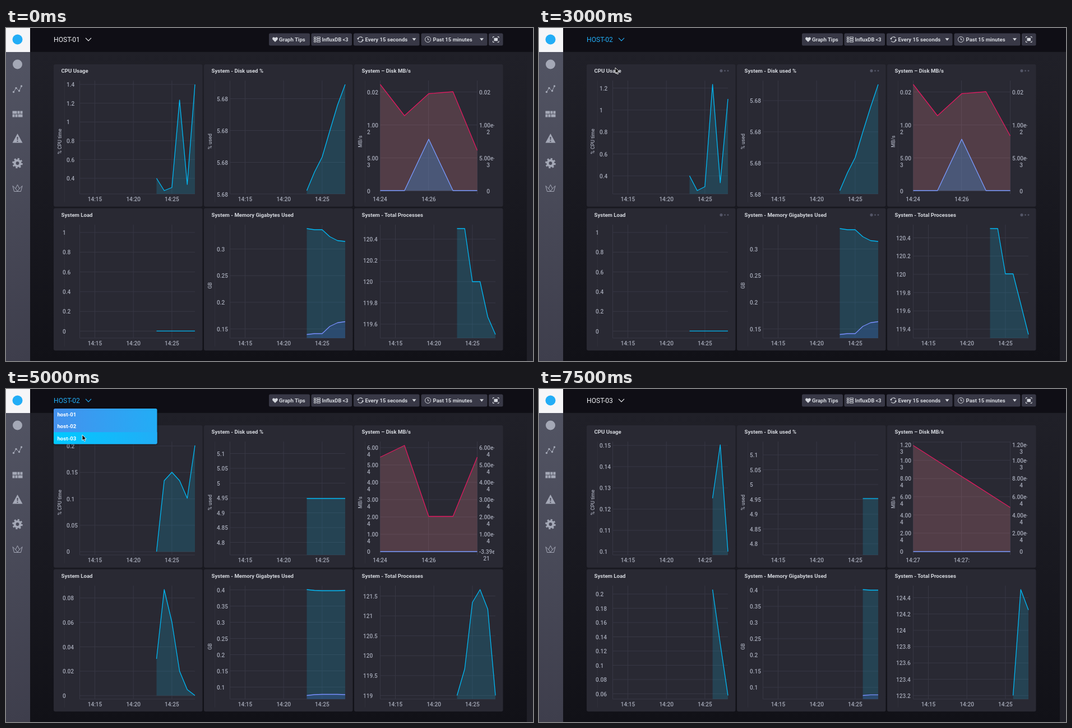
Animation, 940 px wide and 596 px high, one loop 8 s. Source, as an HTML page:

```html
<!DOCTYPE html>
<html lang="en">
<head>
<meta charset="utf-8">
<title>Host dashboard</title>
<style>
html, body { margin: 0; width: 100%; height: 100%; overflow: hidden; background: #17171c; }
svg { display: block; width: 940px; height: 596px; font-family: Roboto, sans-serif; }
text { white-space: pre; }
.bold { font-size: 9.6px; font-weight: 600; fill: #d4d7dd; }
.tick { font-size: 10.1px; font-weight: 500; fill: #a4a8b6; }
.unit { font-size: 8.8px; font-weight: 500; fill: #a4a8b6; }
.host { font-size: 12.1px; }
.mid { text-anchor: middle; }
.grid { stroke: #373744; fill: none; }
.line { fill: none; stroke-width: 1.3; stroke-linejoin: round; }

/* every change is a hard cut on a 250 ms beat */
.scene, .name, .late, #menu, .row, #dots, #cursor, #title, #every {
  animation: 8s step-end infinite;
}
.scene, .name, #menu, .row, #dots { visibility: hidden; }
#s0 { animation-name: s0; }
#s1 { animation-name: s1; }
#s2, #n2 { animation-name: s2; }
#s3, #n3 { animation-name: s3; }
#n1 { animation-name: n1; }
#n2 { animation-name: n2; }
#dots { animation-name: dots; }
#menu { animation-name: menu; }
#row2 { animation-name: row2; }
#row3 { animation-name: row3; }
#title { animation-name: title; fill: #eeeff2; stroke: none; color: #eeeff2; }
#every { animation-name: every; color: #d4d7dd; }
#cursor { animation-name: cursor; transform: translate(342px, -30px); }
@keyframes s0 { 0% { visibility: visible } 28.125% { visibility: hidden } }
@keyframes s1 { 28.125% { visibility: visible } 40.625% { visibility: hidden } }
@keyframes s2 { 40.625% { visibility: visible } 71.875% { visibility: hidden } }
@keyframes s3 { 71.875%, 100% { visibility: visible } }
@keyframes n1 { 0% { visibility: visible } 37.5% { visibility: hidden } }
@keyframes n2 { 37.5% { visibility: visible } 71.875% { visibility: hidden } }
@keyframes dots { 37.5% { visibility: visible } 40.625% { visibility: hidden } }
@keyframes menu {
  21.875% { visibility: visible } 37.5% { visibility: hidden }
  56.25% { visibility: visible } 71.875% { visibility: hidden }
}
@keyframes row2 {
  31.25% { visibility: visible } 37.5% { visibility: hidden }
  59.375% { visibility: visible } 62.5% { visibility: hidden }
}
@keyframes row3 { 62.5% { visibility: visible } 71.875% { visibility: hidden } }
@keyframes title {
  18.75% { fill: #22adf6; color: #22adf6 }
  40.625% { fill: #eeeff2; color: #eeeff2 }
  50% { fill: #6cc4f5; color: #6cc4f5 }
  53.125% { fill: #22adf6; color: #22adf6 }
  71.875% { fill: #eeeff2; color: #eeeff2 }
}
@keyframes every { 90.625% { color: #fff } 93.75% { color: #d4d7dd } }
@keyframes cursor {
  3.125% { transform: translate(342.5px, -9px) }
  6.25% { transform: translate(253px, 37px) }
  12.5% { transform: translate(199px, 29.5px) }
  15.625% { transform: translate(147px, 21.5px) }
  28.125% { transform: translate(144px, 43px) }
  31.25% { transform: translate(139px, 64px) }
  34.375% { transform: translate(136px, 71px) }
  46.875% { transform: translate(138px, 43.5px) }
  50% { transform: translate(144px, 32px) }
  59.375% { transform: translate(140px, 69.5px) }
  62.5% { transform: translate(136px, 82px) }
  65.625% { transform: translate(136px, 87.5px) }
  84.375% { transform: translate(144.5px, 89.5px) }
  87.5% { transform: translate(671.5px, 63px) }
  90.625% { transform: translate(705px, -4px) }
  93.75%, 100% { transform: translate(705px, -30px) }
}
</style>
</head>
<body>
<svg viewBox="0 0 940 596">
  <defs>
    <linearGradient id="page" x2="0" y2="1"><stop stop-color="#202028"/><stop offset="1" stop-color="#111117"/></linearGradient>
    <linearGradient id="side" x2="0" y2="1"><stop stop-color="#525463"/><stop offset="1" stop-color="#3e3e4c"/></linearGradient>
    <linearGradient id="blue"><stop stop-color="#4591ed"/><stop offset="1" stop-color="#22adf6"/></linearGradient>
    <linearGradient id="cyan"><stop stop-color="#00c9ff"/><stop offset="1" stop-color="#22adf6"/></linearGradient>
    <clipPath id="edge"><path d="M621 65H871V320H621Z"/></clipPath>
  </defs>

  <path fill="url(#page)" d="M43 43H940V596H43Z"/>
  <path fill="#202028" d="M929 43H940V596H929Z"/>
  <path fill="#0f0e15" d="M43 0H940V42.5H43Z"/>

  <!-- sidebar -->
  <path fill="url(#side)" d="M0 43H43V596H0Z"/>
  <path fill="#f6f6f8" d="M0 0H43V43H0Z"/>
  <circle cx="20.5" cy="20.5" r="9" fill="#22adf6"/>
  <g fill="#a4a8b6">
    <circle cx="20.5" cy="65" r="8.5"/>
    <path d="M13.5 114.5 18 107.5 23.5 112.5 27.5 104" fill="none" stroke="#a4a8b6"/>
    <circle cx="13.5" cy="114.5" r="1.7"/><circle cx="18" cy="107.5" r="1.7"/>
    <circle cx="23.5" cy="112.5" r="1.7"/><circle cx="27.5" cy="104" r="1.7"/>
    <path d="M11.5 148.5h8v5h-8zM20.5 148.5h4v5h-4zM25.5 148.5h4v5h-4zM11.5 154.5h4v5h-4zM16.5 154.5h4v5h-4zM21.5 154.5h8v5h-8z"/>
    <path fill-rule="evenodd" d="M20.5 189 29.5 205.5H11.5ZM19.4 195l.4 5.5h1.4l.4-5.5zM19.5 202v1.8h2V202z"/>
    <g fill="none" stroke="#a4a8b6">
      <circle cx="20.5" cy="242" r="5" stroke-width="4.2"/>
      <circle cx="20.5" cy="242" r="7.9" stroke-width="2.8" stroke-dasharray="3.1 3.1"/>
      <path d="M14.5 292.5 12 282.5 17 287.5 20.5 280.5 24 287.5 29 282.5 26.5 292.5ZM17 287.5 20.5 292 24 287.5"/>
    </g>
  </g>

  <!-- header -->
  <g id="title">
    <g class="host">
      <text class="name" id="n1" x="85" y="25">HOST-01</text>
      <text class="name" id="n2" x="85" y="25">HOST-02</text>
      <text class="name" id="n3" x="85" y="25">HOST-03</text>
    </g>
    <path d="M142 17.8 147 22.8 152 17.8" fill="none" stroke="currentColor" stroke-width="1.2"/>
  </g>
  <g fill="#383846">
    <rect x="469" y="9.5" width="73" height="22" rx="2.5"/>
    <rect x="544.5" y="9.5" width="72.5" height="22" rx="2.5"/>
    <rect x="620" y="9.5" width="117.5" height="22" rx="2.5"/>
    <rect x="740.5" y="9.5" width="118" height="22" rx="2.5"/>
    <rect x="861" y="9.5" width="25.5" height="22" rx="2.5"/>
  </g>
  <g fill="#d4d7dd">
    <path d="M480 25 476 21C473.500 17.500 477.500 14.800 480 17.700 482.500 14.800 486.500 17.500 484 21Z"/>
    <text class="bold" x="487" y="24">Graph Tips</text>
    <g fill="none" stroke="#d4d7dd">
      <path d="M549.500 16h3v2.300h-3zM549.500 19.500h3v2.300h-3zM549.500 23h3v2.300h-3zM554.500 16h6v2.300h-6zM554.500 19.500h6v2.300h-6zM554.500 23h6v2.300h-6z" stroke-width=".9"/>
      <circle cx="752.500" cy="20.500" r="5"/>
      <path d="M752.500 17.500V21H755"/>
      <path d="M868.500 18v-2.500h2.500M876.500 15.500h2.500V18M879 23v2.500h-2.500M871 25.500h-2.500V23"/>
    </g>
    <text class="bold" x="563.5" y="24" style="font-size:9.1px">InfluxDB &lt;3</text>
    <text class="bold" x="761.5" y="24">Past 15 minutes</text>
    <path d="M845 18.300h7l-3.500 4.500zM870.500 17.700h6.500v5.600h-6.500z"/>
  </g>
  <g id="every" fill="currentColor">
    <path d="M627.800 19A4.600 4.600 0 0 1 636 18M636.400 22A4.600 4.600 0 0 1 628.200 23" fill="none" stroke="currentColor" stroke-width="1.1"/>
    <path d="M626 18.200h4l-2 3zM634.200 22.600h4l-2-3z"/>
    <text class="bold" x="640.5" y="24" style="fill:currentColor">Every 15 seconds</text>
    <path d="M724.500 18.300h7l-3.500 4.500z"/>
  </g>

  <g id="panels"></g>
  <g id="scenes"></g>
  <g id="dots" fill="#545667"></g>

  <!-- host menu -->
  <g id="menu">
    <rect x="85" y="35" width="184.500" height="63.500" rx="2.5" fill="url(#blue)" style="filter:drop-shadow(0 1px 2px rgba(0,0,0,.5))"/>
    <rect class="row" id="row2" x="85" y="56" width="184.500" height="21.200" fill="url(#cyan)"/>
    <path class="row" id="row3" d="M85 77.300H269.500V96a2.500 2.500 0 0 1-2.500 2.500H87.500A2.500 2.500 0 0 1 85 96Z" fill="url(#cyan)"/>
    <g class="bold" style="fill:#fff">
      <text x="91.500" y="48.500">host-01</text>
      <text x="91.500" y="70">host-02</text>
      <text x="91.500" y="91.500">host-03</text>
    </g>
  </g>

  <path id="cursor" d="M0 0V10.200L2.300 8 3.900 11.700 5.600 11 4 7.400H7.200Z" fill="#000" stroke="#fff" stroke-width=".9"/>
</svg>

<script>
const $ = id => document.getElementById(id);
const text = (x, y, s, cls = 'tick') => `<text class="${cls}" x="${x}" y="${y}">${s}</text>`;
const path = (d, attrs) => `<path d="${d}" ${attrs}/>`;

const CYAN = ['#00b9f5', '#18acd0', .2];
const VIOLET = ['#7a8fff', '#3c60b8', .27];
const RED = ['#e0195f', '#c8787f', .26];
const SKY = ['#7a9bff', '#3c88d1', .35];

const COL = 268, ROW = 258;
const TITLES = ['CPU Usage', 'System - Disk used %', 'System – Disk MB/s',
  'System Load', 'System - Memory Gigabytes Used', 'System - Total Processes'];
const UNITS = ['% CPU time', '% used', 'MB/s', '', 'GB', ''];

TITLES.forEach((title, i) => {
  const dx = i % 3 * COL, dy = i > 2 ? ROW : 0;
  const ux = 99 + dx, uy = 203 + dy;
  $('panels').innerHTML +=
    `<rect x="${85 + dx}" y="${65 + dy - (dy ? .5 : 0)}" width="265.500" height="254.700" rx="3" fill="#292933"/>` +
    path(`M${104.5 + dx} ${94 + dy}V${312 + dy}`, 'stroke="#30303b"') +
    text(98.5 + dx, 80.3 + dy, title, 'bold') +
    `<g transform="rotate(-90 ${ux} ${uy})">${text(ux, uy, UNITS[i], 'unit mid')}</g>`;
  [[325, 2.6], [331.5, 1.4], [337, 1.4]].forEach(([x, r]) => {
    $('dots').innerHTML += `<circle cx="${x + dx}" cy="${76.6 + dy}" r="${r}"/>`;
  });
});

// Area with its outline; points are evenly spaced and end at x1.
function series(ys, x1, gap, base, [stroke, fill, alpha]) {
  const x0 = x1 - gap * (ys.length - 1);
  const pts = ys.map((y, i) => `${x0 + gap * i} ${y}`).join('L');
  return path(`M${x0} ${base}L${pts}V${base}Z`, `fill="${fill}" fill-opacity="${alpha}"`) +
    path('M' + pts, `class="line" stroke="${stroke}"`);
}

function chart(col, row, labelX, [value, step, count, y0, dy], ...lines) {
  const left = 131.5 + col * COL, right = left + 205.5;
  const top = 94 + row * ROW, bottom = top + 203;
  let grid = `M${left} ${top}V${bottom}H${right}`, out = '', base = bottom;
  ['14:15', '14:20', '14:25'].forEach((label, i) => {
    const x = left + 27 + 68.7 * i;
    grid += `M${x} ${top}V${bottom}`;
    out += text(x, bottom + 12.6, label, 'tick mid');
  });
  for (let i = 0; i < count; i++) {
    const y = y0 + dy * i, v = +(value - step * i).toFixed(2);
    if (y < bottom) grid += `M${left} ${y - .5}H${right}`;
    if (v === 0) base = y - .5;
    out += text(labelX, y + 3.6, v);
  }
  return path(grid, 'class="grid"') + out +
    lines.map((ys, i) => series(ys, right, 13.7, base, i ? VIOLET : CYAN)).join('');
}

// Two-sided chart whose exponents wrap to a second line.
function diskRate(labels, y0, dy, times, red, blue, lastRight) {
  const left = 667.5, right = 840.5, gap = 173 / (red.length - 1);
  let grid = `M${left} 94V297M753.500 94V291M${right} 94V297`, out = '';
  const list = labels.split(' ');
  list.forEach((label, i) => {
    const y = y0 + dy * i, ty = Math.max(y, 100.5) + 3.6;
    const [main, exp] = label.split('/');
    const [rMain, rExp] = lastRight && i === list.length - 1 ? lastRight : [exp ? main + 'e-' : main, exp];
    grid += `M${left} ${y - .5}H${right}`;
    out += text(644, ty, main);
    out += rMain === '0' ? text(860, ty, rMain, 'tick mid') : text(844, ty, rMain);
    if (exp) out += text(644, ty + 12, exp);
    if (rExp) out += text(rExp.length > 1 ? 857 : 860, ty + 12, rExp, 'tick mid');
  });
  times.forEach((label, i) => out += text(667 + 87 * i, 309.6, label, 'tick mid'));
  return `<g clip-path="url(#edge)">${path(grid, 'class="grid"')}${out}</g>` +
    series(red, right, gap, 291.2, RED) + series(blue, right, 173 / (blue.length - 1), 291.2, SKY);
}

const flat = (y, n) => Array(n).fill(y);
const cpu = (...a) => chart(0, 0, 108, ...a);
const disk = (...a) => chart(1, 0, 376, ...a);
const load = (...a) => chart(0, 1, 101, ...a);
const memory = (...a) => chart(1, 1, 376, ...a);
const processes = (...a) => chart(2, 1, 637, ...a);

const hostOneRate = last => diskRate('0.02 1.00/2 5.00/3 0', 115, 59, ['14:24', '14:26'],
  [101, 157, 117.5, 114, last], [291, 291, 199, 291, 291]);
const hostOneRest = load([1, .2, 6, 366.5, 35.3], flat(542.3, 6)) +
  memory([.3, .05, 4, 396, 47.7], [359, 361, 361, 373.5, 380.5, 382], [548.5, 547, 547, 534, 527.5, 525.5]);

const scenes = [
  cpu([1.4, .2, 6, 101.5, 33.6], [269, 291, 285.5, 129, 280, 101]) +
  disk([5.683, .001, 4, 127, 57], [291, 258, 231, 184, 138, 101]) +
  hostOneRate(219) + hostOneRest +
  processes([120.4, .2, 5, 378.5, 38], [359, 359, 454, 454, 517, 548.5]),

  cpu([1.2, .2, 5, 108, 39.3], [264.5, 291, 284, 101, 277, 127]) +
  disk([5.683, .001, 4, 130.5, 55.8], [291, 259, 232, 186, 142, 101]) +
  hostOneRate(193) + hostOneRest +
  processes([120.4, .2, 6, 376, 32.7], [359, 359, 440, 440, 494, 548.5]),

  cpu([.2, .05, 5, 102.5, 47.3], [291, 164, 149, 164, 195.5, 101]) +
  disk([5.1, .05, 7, 116, 26.5], flat(196, 6)) +
  diskRate('6.00/4 5.00/4 4.00/4 3.00/4 2.00/4 1.00/4 0', 105.5, 31, ['14:24', '14:26'],
    [122, 101, 228, 228, 122], [291, 291], ['-3.39e', '21']) +
  load([.08, .02, 5, 374.5, 43.7], [483, 359, 417, 505, 538, 548.5]) +
  memory([.4, .05, 7, 360, 29], [359, 360.5, 361, 361, 361, 360.5], [548.5, 547, 546.5, 546.5, 546.5, 547]) +
  processes([121.5, .5, 6, 371, 35.6], [548.5, 501, 382, 359, 394, 548.5]),

  cpu([.15, .01, 6, 101.5, 38], [195.5, 100, 291]) +
  disk([5.1, .05, 7, 118.5, 26.5], flat(196, 3)) +
  diskRate('1.20/3 1.00/3 8.00/4 6.00/4 4.00/4 2.00/4 0', 95.5, 32.6, ['14:27', '14:27:'],
    [101, 212], [291, 291]) +
  load([.2, .02, 8, 367.5, 25.5], [359, 456, 548.5]) +
  memory([.4, .05, 7, 360.5, 29], [359, 360, 360], [548.5, 547.3, 547.3]) +
  processes([124.4, .2, 7, 374, 29.2], [548.5, 359, 395.5])
];
$('scenes').innerHTML = scenes.map((s, i) => `<g class="scene" id="s${i}">${s}</g>`).join('');
</script>
</body>
</html>
```
